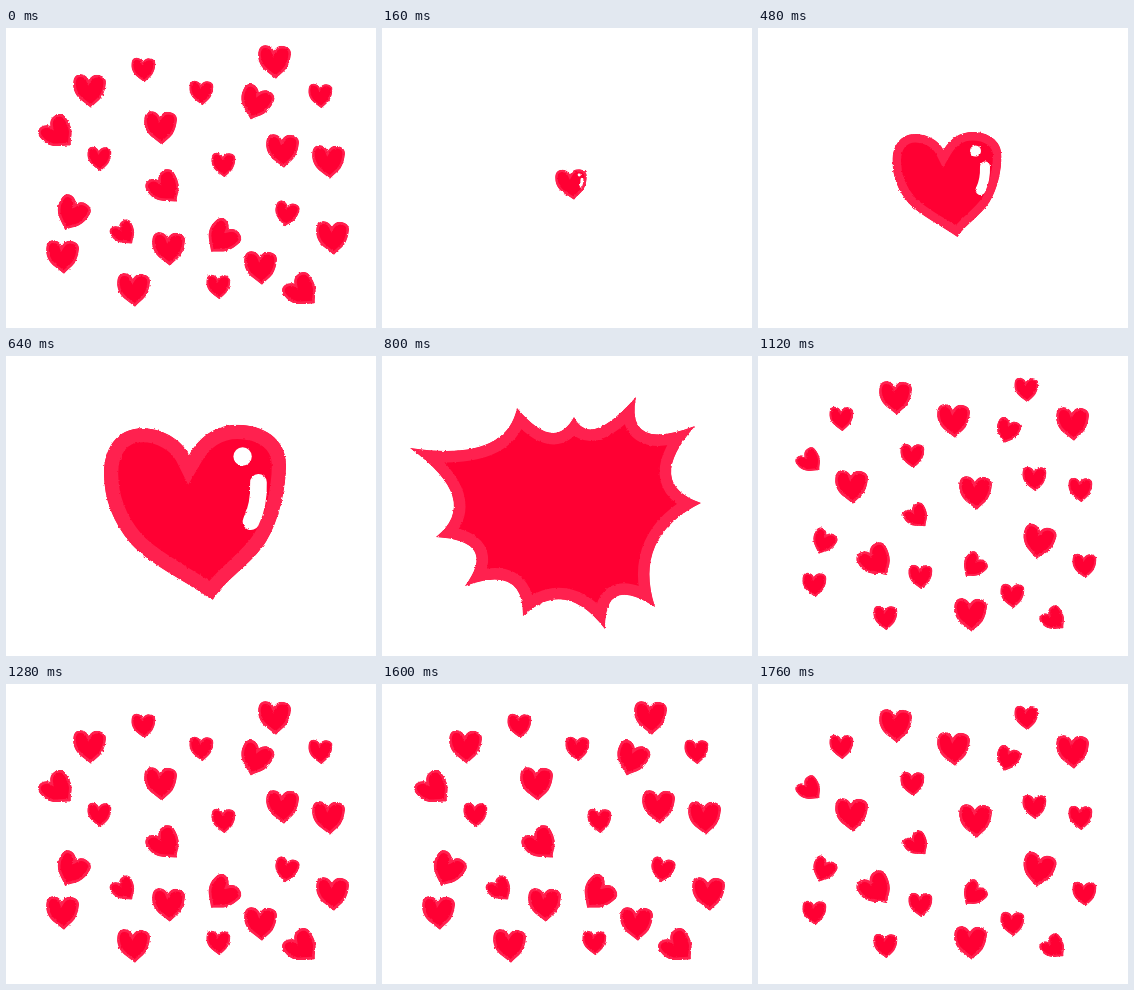
An HTML page that plays this animation: 370x300 px, repeating every 1.92 s.

```html
<!DOCTYPE html>
<html lang="en">
<head>
<meta charset="utf-8">
<title>Bursting heart</title>
<style>
  html, body { margin: 0; width: 100%; height: 100%; overflow: hidden; background: #fff; }
  svg { display: block; }
  /* the stroke is clipped to its shape, so only its inner half shows as a rim */
  .rimmed { fill: #ff0033; stroke: #ff214f; }
</style>
</head>
<body>
<svg width="370" height="300" viewBox="0 0 370 300">
  <defs>
    <filter id="rough" filterUnits="userSpaceOnUse" x="0" y="0" width="370" height="300" color-interpolation-filters="sRGB">
      <feTurbulence type="fractalNoise" baseFrequency=".35" numOctaves="2" seed="4"/>
      <feDisplacementMap in="SourceGraphic" scale="2.5" xChannelSelector="R" yChannelSelector="G"/>
    </filter>
    <path id="outline" d="M185 122C180 112 168 106 157 106C141 106 134 119 134 133C134 148 139 162 150 175C162 188 184 198 199 209C207 196 222 188 231 174C239 161 243 142 243 128C243 112 229 104 214 104C202 104 192 110 185 122Z"/>
    <path id="spikes"/>
    <clipPath id="inHeart"><use href="#outline"/></clipPath>
    <clipPath id="inSpikes"><use href="#spikes"/></clipPath>
    <g id="heart" transform="translate(-188.5 -156.5)">
      <use href="#outline" class="rimmed" stroke-width="17" clip-path="url(#inHeart)"/>
    </g>
  </defs>
  <g filter="url(#rough)">
    <g id="field" transform="translate(0 1)"></g>
    <g id="grow">
      <use href="#heart"/>
      <g transform="translate(-188.5 -156.5)">
        <circle cx="217" cy="123" r="5.5" fill="#fff"/>
        <path d="M226.500 138.500Q227 152 222 162" fill="none" stroke="#fff" stroke-width="10" stroke-linecap="round"/>
      </g>
    </g>
    <use id="burst" href="#spikes" class="rimmed" stroke-width="23" clip-path="url(#inSpikes)"/>
  </g>
</svg>
<script>
const STEP = 160, STEPS = 12, BURST = 5;
const [field, grow, burst, spikes] = ['field', 'grow', 'burst', 'spikes'].map(id => document.getElementById(id));

// Neighbouring tips are joined by arcs that sag towards the middle.
const tips = [[28, 92], [135, 52], [192, 61], [254, 41], [313, 70], [319, 147],
  [273, 251], [223, 273], [141, 260], [83, 230], [54, 181]];
const middle = [185, 155], SAG = .41;
const arcs = tips.map((tip, i) => {
  const next = tips[(i + 1) % tips.length];
  const bend = middle.map((m, k) => (tip[k] + next[k]) / 2 * (1 - SAG) + m * SAG);
  return `Q${bend} ${next}`;
});
spikes.setAttribute('d', `M${tips[0]}${arcs.join('')}Z`);

// Centre and, where a heart leans, its angle. Every third one beats against the others.
const spots = [
  [83, 62], [268, 33], [137, 41], [249, 74, 25], [52, 105, -38], [195, 64],
  [154, 99], [276, 122], [314, 67], [322, 133], [159, 160, -32], [93, 130],
  [65, 185, 31], [56, 228], [217, 136], [162, 220], [326, 209], [280, 185, 16],
  [215, 209, 46], [254, 239], [118, 205, -30], [127, 261], [296, 263, -38], [212, 258]
];
const hearts = spots.map(([x, y, lean = 4], i) => {
  const node = document.createElementNS('http://www.w3.org/2000/svg', 'use');
  node.setAttribute('href', '#heart');
  field.append(node);
  return { node, offbeat: i % 3 === 2, place: `translate(${x} ${y}) rotate(${lean})` };
});

const show = (node, on) => node.setAttribute('display', on ? 'inline' : 'none');

function draw(step) {
  show(grow, step > 0 && step < BURST);
  show(burst, step === BURST);
  show(field, step === 0 || step > BURST);

  const growth = .25 + step * (.105 * step - .065);
  grow.setAttribute('transform', `translate(189 156.5) scale(${growth})`);

  const odd = step % 2 === 1;
  for (const { node, offbeat, place } of hearts) {
    const size = offbeat === odd ? .3 : .22;
    node.setAttribute('transform', `${place} scale(${size} ${size * 1.06})`);
  }
}

let last = -1;
function tick() {
  const step = Math.floor(performance.now() / STEP) % STEPS;
  if (step !== last) draw(last = step);
  requestAnimationFrame(tick);
}
tick();
</script>
</body>
</html>
```
